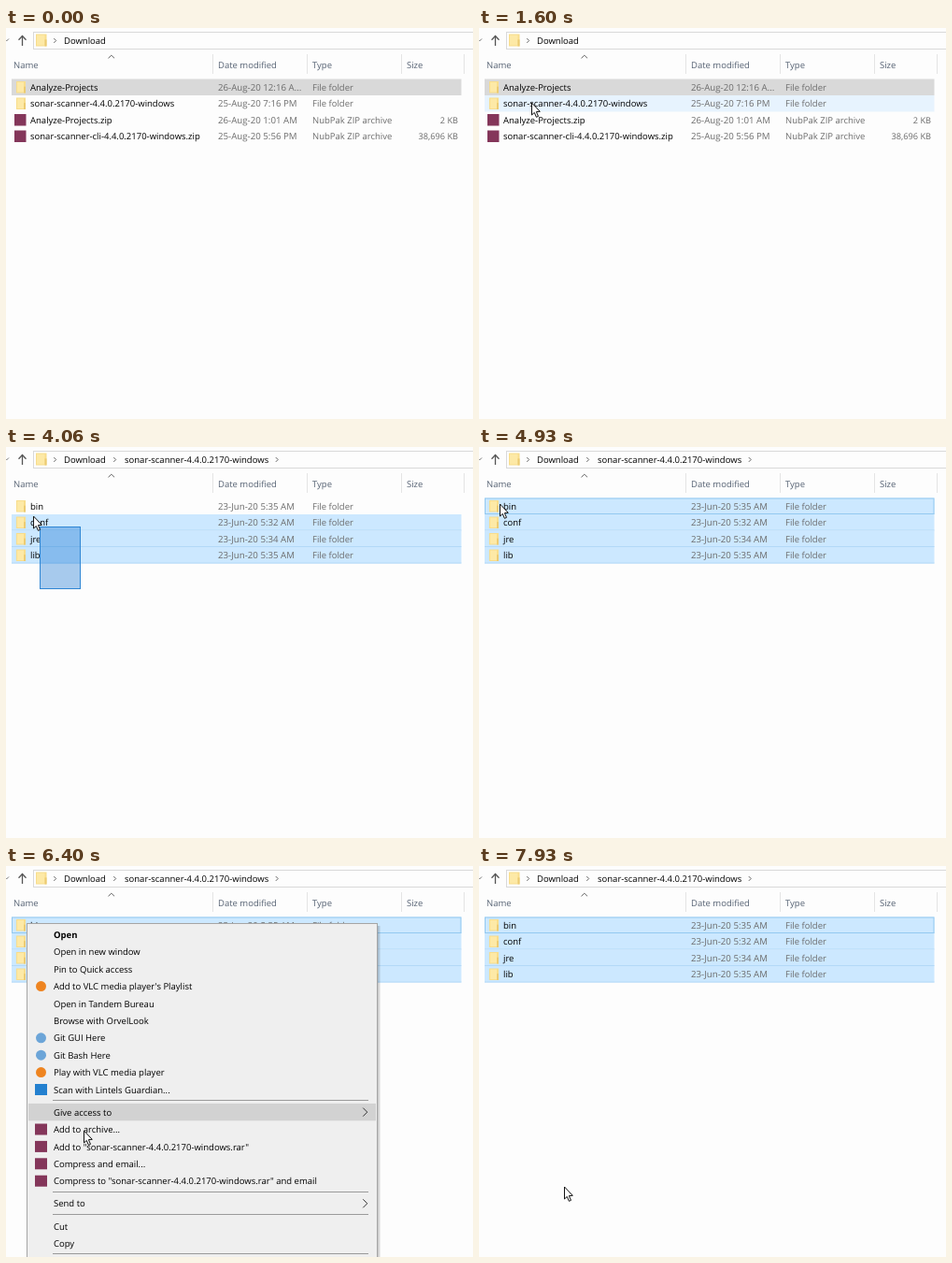
An HTML page with a canvas for the animation above (8000 ms loop, 500x418 px).

```html
<!DOCTYPE html>
<html lang="en">
<head>
<meta charset="utf-8">
<title>Folder browsing</title>
<style>
html, body { margin: 0; width: 100%; height: 100%; overflow: hidden; background: #fdfdfd; }
canvas { display: block; width: 500px; height: 418px; }
</style>
</head>
<body>
<canvas id="stage" width="500" height="418"></canvas>
<script>
const ctx = document.getElementById('stage').getContext('2d');
const LOOP = 8000, STEP = 200 / 3;
const FONT = '"Open Sans", "Noto Sans", sans-serif';
const INK = '#000', GREY = '#6c6c6c', HEAD = '#566273';
const ARCHIVE = '#84365a', CONE = '#ee8420', GIT = '#6ca5d8', SHIELD = '#2380cf';
const ROW_TOP = 54.5, ROW_H = 17.5;

const SHOW = 430, SELECT = 2060, OPEN = 2260, DRAG = 3660, DROP = 4390;
const MENU_IN = 5590, MENU_OUT = 7860, HOVER_LAG = 2 * STEP;

const folder = (name, date) => ({ name, date, type: 'File folder', folder: true });
const zip = (name, date, size) => ({ name, date, size, type: 'NubPak ZIP archive' });
const downloads = [
  folder('Analyze-Projects', '26-Aug-20 12:16 A...'),
  folder('sonar-scanner-4.4.0.2170-windows', '25-Aug-20 7:16 PM'),
  zip('Analyze-Projects.zip', '26-Aug-20 1:01 AM', '2 KB'),
  zip('sonar-scanner-cli-4.4.0.2170-windows.zip', '25-Aug-20 5:56 PM', '38,696 KB')
];
const scanner = [
  folder('bin', '23-Jun-20 5:35 AM'),
  folder('conf', '23-Jun-20 5:32 AM'),
  folder('jre', '23-Jun-20 5:34 AM'),
  folder('lib', '23-Jun-20 5:35 AM')
];

// label, icon colour, icon shape; null is a separator
const menu = [
  ['Open'], ['Open in new window'], ['Pin to Quick access'],
  ["Add to VLC media player's Playlist", CONE, 'dot'],
  ['Open in Tandem Bureau'], ['Browse with OrvelLook'],
  ['Git GUI Here', GIT, 'dot'], ['Git Bash Here', GIT, 'dot'],
  ['Play with VLC media player', CONE, 'dot'],
  ['Scan with Lintels Guardian...', SHIELD, 'box'],
  null, ['Give access to', '', 'more'],
  ['Add to archive...', ARCHIVE, 'box'],
  ['Add to "sonar-scanner-4.4.0.2170-windows.rar"', ARCHIVE, 'box'],
  ['Compress and email...', ARCHIVE, 'box'],
  ['Compress to "sonar-scanner-4.4.0.2170-windows.rar" and email', ARCHIVE, 'box'],
  null, ['Send to', '', 'more'],
  null, ['Cut'], ['Copy'], null
];

// time, x, y, eased
const path = [
  [0, 62, 125], [930, 62, 125], [1530, 56, 80, 1], [3000, 56, 80],
  [3400, 80, 131, 1], [3600, 79, 151, 1], [3667, 79, 151],
  [4000, 36, 85], [4067, 29, 74], [4267, 22, 61],
  [5800, 22, 61], [6267, 79, 266, 1], [6400, 83, 283],
  [7000, 91, 343, 1], [LOOP, 91, 343]
];

function pointer(t) {
  const i = Math.max(1, path.findIndex(k => k[0] >= t));
  const [t0, x0, y0] = path[i - 1], [t1, x1, y1, eased] = path[i];
  let k = Math.max(0, (t - t0) / (t1 - t0));
  if (eased) k = k * k * (3 - 2 * k);
  return { x: x0 + (x1 - x0) * k, y: y0 + (y1 - y0) * k };
}

function rect(x, y, w, h, color) {
  ctx.fillStyle = color;
  ctx.fillRect(x, y, w, h);
}

function line(color, width, ...pts) {
  ctx.strokeStyle = color;
  ctx.lineWidth = width;
  ctx.beginPath();
  for (let i = 0; i < pts.length; i += 2) ctx.lineTo(pts[i], pts[i + 1]);
  ctx.stroke();
}

function frame(x, y, w, h, color) {
  ctx.strokeStyle = color;
  ctx.lineWidth = 1;
  ctx.strokeRect(x, y, w, h);
}

function text(s, x, y, color = INK, { size = 9.5, weight = 400, align = 'left' } = {}) {
  ctx.font = `${weight} ${size}px ${FONT}`;
  ctx.textRendering = 'geometricPrecision';
  ctx.textAlign = align;
  ctx.fillStyle = color;
  ctx.fillText(s, x, y);
}

function folderIcon(x, y, w, h) {
  rect(x, y, w, h, '#f8dd8c');
  rect(x + 1, y + 1, w - 3, h - 2, '#fde9a6');
  rect(x + w - 2, y + h * 0.45, 2, h * 0.55, '#eccb72');
}

const chevron = (x, y, r, color = '#666') => line(color, 1, x - r / 2, y - r, x + r / 2, y, x - r / 2, y + r);

function drawHeader(inside) {
  frame(29.5, 4.5, 490, 18, '#d9d9d9');
  line('#777', 1, -2, 11.5, 0.5, 14, 3, 11.5);
  line('#555', 1.3, 17.5, 19, 17.5, 8.5);
  line('#555', 1.3, 13.5, 12.7, 17.5, 8.5, 21.5, 12.7);
  folderIcon(32, 6.5, 11.5, 13);
  chevron(52.5, 13.5, 2.4);
  text('Download', 62, 17);
  if (inside) {
    chevron(116.5, 13.5, 2.4);
    text('sonar-scanner-4.4.0.2170-windows', 127, 17);
    chevron(290, 13.5, 2.4);
  }
  [['Name', 8], ['Date modified', 227], ['Type', 328], ['Size', 429]]
    .forEach(([s, x]) => text(s, x, 42.8, HEAD));
  [221.5, 322.5, 423.5, 490.5].forEach(x => line('#e4e4e4', 1, x, 28, x, 49));
  line('#666', 1, 109.5, 32.3, 112.8, 29.2, 116.1, 32.3);
}

function drawRow(row, i, fill, outline) {
  const top = ROW_TOP + ROW_H * i, base = top + 12.3;
  if (fill) rect(6, top, 481.5, ROW_H, fill);
  if (fill === '#cce8ff') line('#b3d9f7', 1, 6, top + ROW_H - 0.5, 487.5, top + ROW_H - 0.5);
  if (outline) frame(6.5, top + 0.5, 480.5, ROW_H - 1, '#93c9f0');
  if (row.folder) folderIcon(11, top + 2.5, 10, 12.5);
  else rect(9, top + 2.5, 12.5, 12.5, ARCHIVE);
  text(row.name, 26, base);
  text(row.date, 227, base, GREY, { size: 9.7 });
  text(row.type, 328, base, GREY);
  if (row.size) text(row.size, 484, base, GREY, { size: 9.2, align: 'right' });
}

function marqueeAt(t) {
  if (t < DRAG || t >= DROP) return null;
  const p = pointer(t - STEP);
  return { x: p.x, y: p.y, w: 79 - p.x, h: 151 - p.y };
}

function drawList(t, marquee) {
  const inside = t >= OPEN;
  const hover = t >= SHOW && t < DRAG ? Math.floor((pointer(t).y - ROW_TOP) / ROW_H) : -1;
  (inside ? scanner : downloads).forEach((row, i) => {
    let fill = i === hover ? '#e7f3fe' : '';
    if (!inside && i === (t < SELECT ? 0 : 1)) fill = t < SELECT ? '#d9d9d9' : '#cce8ff';
    const caught = marquee && marquee.h > 1 && ROW_TOP + ROW_H * (i + 1) > marquee.y;
    if (caught || t >= DROP) fill = '#cce8ff';
    drawRow(row, i, fill, t >= DROP && i === 0);
  });
}

function drawMarquee({ x, y, w, h }) {
  if (h < 1) return;
  rect(x, y, w, h, 'rgba(0, 102, 204, .34)');
  frame(Math.round(x) + 0.5, Math.round(y) + 0.5, Math.round(w), Math.round(h), '#2f86d4');
}

function drawMenu(t) {
  ctx.globalAlpha = Math.min(1, (t - MENU_IN + STEP) / (3 * STEP));
  for (let i = 1; i < 5; i++) rect(397, 64, i, 360, 'rgba(0, 0, 0, .07)');
  rect(22, 61, 376, 370, '#efefef');
  frame(22.5, 61.5, 375, 370, '#a5a5a5');
  const p = pointer(t - HOVER_LAG);
  let y = 64.2;
  menu.forEach((item, i) => {
    if (!item) {
      line('#9a9a9a', 1, 50, Math.round(y + 2) + 0.5, 388, Math.round(y + 2) + 0.5);
      y += 5.7;
      return;
    }
    const [label, color, shape] = item, mid = y + 9.2;
    if (t > 5900 && p.y >= y && p.y < y + 18.4) rect(24, y, 372, 18.4, '#d2d2d2');
    if (shape === 'dot') {
      ctx.fillStyle = color;
      ctx.beginPath();
      ctx.arc(37.5, mid, 5.5, 0, 7);
      ctx.fill();
    }
    if (shape === 'box') rect(31, mid - 6, 13, 12, color);
    if (shape === 'more') chevron(384.5, mid, 4.5, '#333');
    text(label, 51, mid + 3.6, INK, { weight: i ? 400 : 700 });
    y += 18.4;
  });
  ctx.globalAlpha = 1;
}

function drawCursor({ x, y }) {
  ctx.save();
  ctx.translate(x, y);
  ctx.beginPath();
  [[0.5, 0], [0.5, 13], [3.3, 10.4], [5.4, 15.3], [7.5, 14.4], [5.4, 9.6], [9.3, 9.3]]
    .forEach(q => ctx.lineTo(...q));
  ctx.closePath();
  ctx.fillStyle = '#fff';
  ctx.fill();
  ctx.strokeStyle = '#111';
  ctx.lineWidth = 1;
  ctx.stroke();
  ctx.restore();
}

function draw(t) {
  rect(0, 0, 500, 418, '#fdfdfd');
  drawHeader(t >= OPEN);
  const marquee = marqueeAt(t);
  drawList(t, marquee);
  if (marquee) drawMarquee(marquee);
  if (t >= MENU_IN && t < MENU_OUT) drawMenu(t);
  if (t >= SHOW) drawCursor(pointer(t));
}

const start = performance.now();
function tick() {
  const t = (performance.now() - start) % LOOP;
  draw(Math.min(119, Math.floor((t + 7) / STEP)) * STEP);
  requestAnimationFrame(tick);
}
tick();
</script>
</body>
</html>
```
